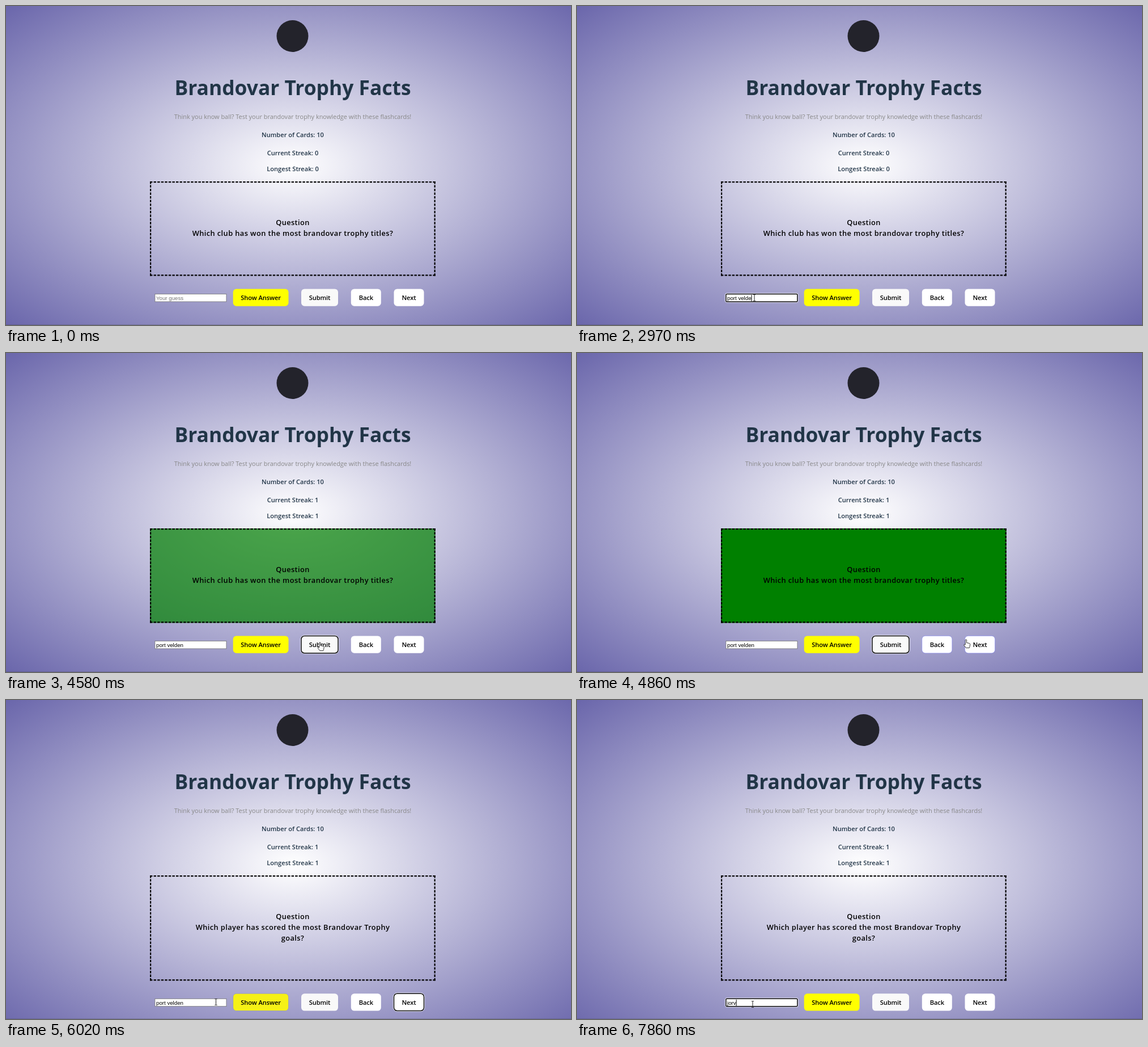
These frames come from a looping animation (997x562 px, 8000 ms). An HTML page:

```html
<!DOCTYPE html>
<html lang="en">
<head>
<meta charset="utf-8">
<title>Flashcards</title>
<style>
  html, body { margin: 0; width: 100%; height: 100%; overflow: hidden; }
  svg { position: absolute; left: 0; top: 0; width: 997px; height: 562px; font: 600 11.1px "Open Sans", "Noto Sans", sans-serif; }
  /* The page is laid out at 1366 px and shown at 73 % */
  #box { position: absolute; left: 254px; top: 308.5px; width: 690px; box-sizing: border-box;
    border: 3px dashed #000; transform: scale(.73); transform-origin: 0 0; }
  .mid { text-anchor: middle; }
  .card { font-size: 12.8px; letter-spacing: .42px; }
  .field { font: 9.7px "Liberation Sans", Arial, sans-serif; }
</style>
</head>
<body>
<div id="box"></div>
<svg viewBox="0 0 997 562" xmlns="http://www.w3.org/2000/svg">
  <rect y="561" width="997" height="1" fill="#445" opacity=".3"/>
  <circle cx="505.5" cy="53" r="28" fill="#23232b"/>
  <g class="mid" fill="#213547">
    <text x="506" y="157" font-size="35.4" font-weight="700">Brandovar Trophy Facts</text>
    <text x="506" y="199.3" font-size="10.95" font-weight="400" fill="#888">Think you know ball? Test your brandovar trophy knowledge with these flashcards!</text>
    <text x="506" y="231">Number of Cards: 10</text>
    <text x="506" y="263" id="current"></text>
    <text x="506" y="291" id="longest"></text>
  </g>
  <g class="mid card">
    <text x="506" y="386">Question</text>
    <text x="506" y="405" id="line1"></text>
    <text x="506" y="424" id="line2"></text>
  </g>
  <g id="controls">
    <rect id="ring" fill="none" stroke="#fff" stroke-width=".9"/>
    <rect id="input" x="262.9" y="507.5" width="126" height="13.4" fill="#fff"/>
    <rect id="selection" y="509" height="11" fill="#6db1ff"/>
    <text id="value" class="field" x="265" y="517.8"></text>
    <rect id="caret" y="509" width="1" height="11"/>
  </g>
  <g id="cursor">
    <circle id="press" r="9" cy="1" fill="#f5ee20" opacity=".65"/>
    <path id="hand" fill="#fff" stroke="#222" stroke-width=".9" stroke-linejoin="round"
      d="M-1.3 8V0a1.2 1.2 0 0 1 2.4 0V4.5l4.6.9q1.6.4 1.5 2L6.5 11.5 5.8 13.5H-.2L-3.6 8.8q-.5-1.4.9-1.5z"/>
    <path id="beam" fill="none" stroke="#222" d="M-2-5.5h1.5l.5.5.5-.5H2M0-5V5M-2 5.5h1.5L0 5l.5.5H2"/>
    <path id="arrow" fill="#fff" stroke="#222" stroke-width=".8" d="M0 0V12l2.8-2.6L4.6 13.4l1.7-.8L4.6 8.8h3.8z"/>
  </g>
</svg>
<script>
// The screen refreshes once per tick; all moments below are tick numbers.
const LOOP = 8000, START = 265, TICK = 143;
const ENTER = 4, SUBMIT = 28, NEXT = 34, DRAG = 43, CLEAR = 47;

// Places where the pointer rests or turns: tick, x, y
const path = [
  [0, 520, 494], [ENTER, 313, 514], [22, 313, 514], [27, 554, 511], [30, 554, 511],
  [32, 686.5, 506], [NEXT, 706, 514], [37, 706, 514], [40, 370.5, 532],
  [42, 318, 534], [DRAG, 318, 534], [46, 268, 535], [48, 310, 536]
];

const $ = id => document.getElementById(id);
const set = (el, attrs) => { for (const k in attrs) el.setAttribute(k, attrs[k]); };
const show = (id, on) => set($(id), { visibility: on ? "visible" : "hidden" });
const clamp = (v, lo, hi) => Math.min(hi, Math.max(lo, v));
const rise = d => d > 0 ? 1 - .3 ** (d * d) : 0;

function add(tag, attrs, text = "") {
  const el = document.createElementNS("http://www.w3.org/2000/svg", tag);
  set(el, attrs);
  el.textContent = text;
  return $("controls").appendChild(el);
}

const buttons = [
  ["Show Answer", 400.7, 97.8, "#ff0"],
  ["Submit", 521, 65, "#f9f9f9"],
  ["Back", 608.8, 53, "#fff"],
  ["Next", 684.5, 53, "#fff"]
].map(([label, x, width, fill]) => {
  const rect = add("rect", { x, y: 498.4, width, height: 30.4, rx: 5.8 });
  add("text", { x: x + width / 2, y: 517.8, class: "mid", "letter-spacing": "-.1" }, label);
  return { label, x, width, fill, rect };
});

function pointer(n) {
  const i = path.findIndex(p => p[0] > n);
  if (i < 1) return path.at(i).slice(1);
  const [a, ax, ay] = path[i - 1], [b, bx, by] = path[i];
  const u = (n - a) / (b - a), e = u * u * (3 - 2 * u);
  return [ax + (bx - ax) * e, ay + (by - ay) * e];
}

// Text typed evenly between two ticks
function type(text, n, from, to) {
  const done = (n - from + 1) / (to - from + 1);
  return text.slice(0, Math.round(clamp(done, 0, 1) * text.length));
}

function focusAt(n) {
  if (n >= DRAG) return "input";
  if (n > NEXT) return "Next";
  if (n > SUBMIT) return "Submit";
  return n >= ENTER ? "input" : "";
}

function drawPage(n, second, shift) {
  const cy = 281 + shift / 2, streak = n > SUBMIT + 1 ? 1 : 0;
  document.body.style.background =
    `radial-gradient(716px ${cy * Math.SQRT2}px at 506px ${cy}px, #fff, #6a66ab)`;
  $("current").textContent = "Current Streak: " + streak;
  $("longest").textContent = "Longest Streak: " + streak;
  $("line1").textContent = second
    ? "Which player has scored the most Brandovar Trophy"
    : "Which club has won the most brandovar trophy titles?";
  $("line2").textContent = second ? "goals?" : "";
  $("box").style.height = 228 + shift / .73 + "px";
  $("box").style.background = `rgba(0,128,0,${rise(n - SUBMIT - 1) - rise(n - NEXT)})`;
  set($("controls"), { transform: `translate(0 ${shift})` });
}

// Returns whether the pointer is on a button; hover fades over one tick
function drawButtons(n, focus, shift) {
  const over = (b, [x, y]) => x >= b.x && x <= b.x + b.width && Math.abs(y - 513.6 - shift) < 15;
  let any = false;
  for (const b of buttons) {
    const now = over(b, pointer(n)), active = focus === b.label;
    const hover = (now + over(b, pointer(n - 1))) / 2;
    any ||= now;
    set(b.rect, {
      fill: hover && b.fill === "#ff0" ? "#f6f116" : b.fill,
      stroke: active ? "#101010" : `rgba(100,108,255,${hover})`,
      "stroke-width": active ? 1.5 : .8
    });
    if (active) set($("ring"), { x: b.x - 1.1, y: 497.3, width: b.width + 2.2, height: 32.6, rx: 7 });
  }
  return any;
}

function drawField(n, typing, x) {
  if (typing) set($("ring"), { x: 261.7, y: 506.3, width: 128.4, height: 15.8, rx: 2.3 });
  set($("input"), {
    stroke: typing ? "#101010" : "#767676",
    "stroke-width": typing ? 1.5 : .8,
    rx: typing ? 1.5 : 0
  });
  const text = n < CLEAR ? type("port velden", n, 8, 19) : type("jorv", n, 50, 53);
  $("value").textContent = text || "Your guess";
  set($("value"), { fill: text ? "#000" : "#757575" });
  const end = 265 + (text ? $("value").getComputedTextLength() : 0);
  const from = n >= DRAG && n < CLEAR ? clamp(x, 265, end) : end;
  set($("selection"), { x: from, width: end - from });
  set($("caret"), { x: from });
  show("caret", typing);
}

function draw(t) {
  const n = Math.floor((t - START) / TICK);
  const second = n > NEXT, shift = second ? 18.8 : 0;
  const focus = focusAt(n), [x, y] = pointer(n);

  drawPage(n, second, shift);
  show("ring", focus);
  const hand = drawButtons(n, focus, shift);
  drawField(n, focus === "input", x);

  const seen = n >= 0;
  const beam = !hand && x > 262 && x < 390 && Math.abs(y - 514 - shift) < 8;
  const pressed = n === ENTER || n === SUBMIT || n === SUBMIT + 1 || n === NEXT || n >= DRAG && n < CLEAR;
  set($("cursor"), { transform: `translate(${x} ${y})` });
  show("press", seen && pressed);
  show("hand", seen && hand);
  show("beam", seen && beam);
  show("arrow", seen && !hand && !beam);
}

function frame() {
  draw(performance.now() % LOOP);
  requestAnimationFrame(frame);
}
frame();
</script>
</body>
</html>
```
